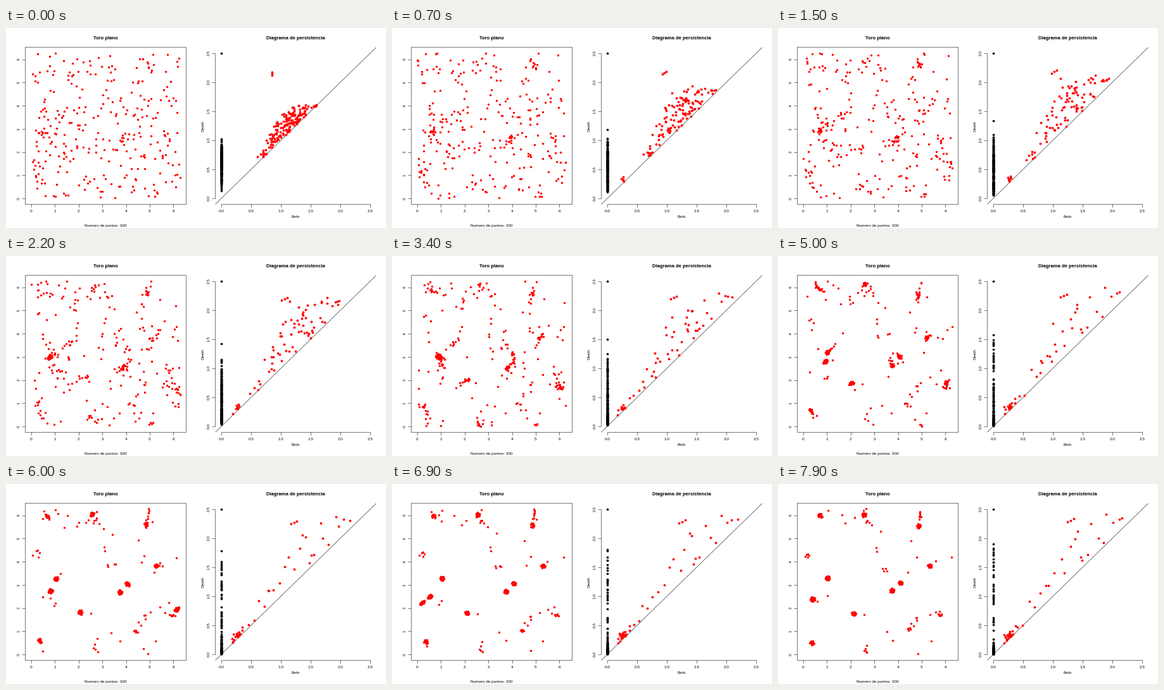
Recreate the animation shown at these times as a matplotlib script. Size 600 by 317 pixels, loop 8000 ms.

```python
import numpy as np
import matplotlib.pyplot as plt
from matplotlib.animation import FuncAnimation

W, H = 600, 317
FRAMES, STEP = 80, 100
DT = STEP / 1000
END = (FRAMES - 1) * DT
PX = 0.72  # points per pixel at 100 dpi
TAU = 2 * np.pi
N = 300
rng = np.random.default_rng(11)

# Columns of the torus where the particles slowly gather
HUBS = np.array([(0.4, 3.9), (2.2, 1.0), (3.4, 3.5), (5.0, 4.9), (5.8, 1.5), (4.6, 1.2),
                 (0.6, 6.2), (1.8, 4.6), (2.6, 6.0), (2.9, 1.6), (5.7, 4.0), (4.7, 3.1)])


def wrap(d):
    return (d + np.pi) % TAU - np.pi


def drift(p, t):
    """Velocity: long-range attraction, short-range repulsion, pull to the hubs."""
    d = wrap(p[None] - p[:, None])
    d2 = (d ** 2).sum(2)
    force = np.exp(-d2 / (2 * 0.55 ** 2)) - 4 * np.exp(-d2 / (2 * 0.08 ** 2))
    v = (0.1 + 0.3 * np.exp(-t / 0.6)) * (d * force[:, :, None]).sum(1)
    h = wrap(HUBS[None] - p[:, None, :2])
    near = np.exp(-(h ** 2).sum(2) / (2 * 0.5 ** 2))
    v[:, :2] += 0.12 * (h * near[:, :, None]).sum(1)
    return v


def tree_edges(p):
    """Edge lengths of the minimum spanning tree: deaths of the components."""
    dist = np.sqrt((wrap(p[None] - p[:, None]) ** 2).sum(2))
    best = dist[0].copy()
    best[0] = np.inf
    free = np.ones(N, bool)
    free[0] = False
    edges = []
    while free.any():
        k = np.argmin(np.where(free, best, np.inf))
        edges.append(best[k])
        free[k] = False
        best = np.minimum(best, dist[k])
    return np.array(edges)


# The torus is three-dimensional; the plot shows its first two angles
paths = [rng.uniform(0, TAU, (N, 3))]
for i in range(FRAMES - 1):
    paths.append((paths[-1] + DT * drift(paths[-1], i * DT)) % TAU)
deaths = [tree_edges(p) for p in paths]

# Loops: a few last, the others die out
LONG, SHORT, TINY = 22, 143, 22
M = LONG + SHORT
birth0 = np.r_[np.linspace(0.61, 1.6, LONG), np.clip(rng.normal(1.12, 0.2, SHORT), 0.7, 1.58)]
height = rng.beta(1.2, 1.6, M)
life = np.r_[np.full(LONG, np.inf), rng.exponential(1.9, SHORT)]
phase = rng.uniform(0, TAU, (M, 2))

# Tiny loops appear inside the clumps
tiny_birth = rng.normal(0.25, 0.035, TINY)
tiny_death = tiny_birth + 0.01 + rng.exponential(0.04, TINY)
tiny_start = np.maximum(np.linspace(-1, 7.5, TINY), 0.1)
tiny_phase = rng.uniform(0, TAU, TINY)


def components(i):
    v = np.append(deaths[i], 2.5)
    return np.column_stack([0 * v, v])


def loops(t):
    r = 1 - np.exp(-t / 0.7)
    wob = 0.025 * r * np.sin(2.1 * t + phase)
    birth = 1.1 + 0.15 * r + (birth0 - 1.1) * (1.9 - 0.9 * np.exp(-t / 2.5)) + wob[:, 0]
    room = 1.62 + 0.88 * (1 - np.exp(-t / 1.5)) - birth
    rise = height * room * np.minimum(birth / 1.1, 1) ** 3
    death = np.minimum(birth + np.maximum(rise + wob[:, 1], 0.012), 2.5)
    main = np.column_stack([birth, death])[life > t]

    k = np.arange(3)
    circles = np.column_stack([0.85 + 0.08 * r + 0.04 * t + 0.05 * k * r,
                               2.15 + 0.02 * t + 0.025 * (k - 1)])

    sway = 0.012 * np.sin(1.7 * t + tiny_phase)
    tiny = np.column_stack([tiny_birth + sway, tiny_death + sway])[tiny_start <= t]
    return np.vstack([main, circles, tiny])


def left_px(p):
    return np.column_stack([40 + 37.4 * p[:, 0], 270 - 36.75 * p[:, 1]])


def right_px(p):
    return np.column_stack([340 + 94 * p[:, 0], 270 - 92 * p[:, 1]])


plt.rcParams["font.family"] = "Liberation Sans"
fig = plt.figure(figsize=(W / 100, H / 100), dpi=100, facecolor="white")
ax = fig.add_axes([0, 0, 1, 1])
ax.set_xlim(0, W)
ax.set_ylim(H, 0)
ax.axis("off")


def line(xs, ys):
    ax.plot(xs, ys, color="black", lw=0.38, solid_capstyle="butt", zorder=1)


def text(x, y, s, size=6.4, **kw):
    ax.text(x, y, s, fontsize=size * PX, ha="center", va="center", **kw)


def ticks(xs, ys, labels, x0):
    for x, y, s in zip(xs, ys, labels):
        line([x, x], [279, 284])
        line([x0 - 5, x0], [y, y])
        text(x, 290.7, s)
        text(x0 - 10, y, s, rotation=90)


def dots(color, size, z):
    return ax.scatter([], [], s=(size * PX) ** 2, c=color, linewidths=0, zorder=z)


line([30, 284, 284, 30, 30], [30, 30, 279, 279, 30])
n = np.arange(7)
ticks(40 + 37.4 * n, 270 - 36.75 * n, [str(k) for k in n], 30)

v = np.arange(6) / 2
line([340, 575], [279, 279])
line([330, 330], [40, 270])
line([330.6, 584.4], [279.2, 30.8])
ticks(340 + 94 * v, 270 - 92 * v, [f"{k:.1f}" for k in v], 330)

text(157.3, 16.5, "Toro plano", 7.68, weight="bold")
text(457.5, 16.5, "Diagrama de persistencia", 7.68, weight="bold")
text(157.5, 313, f"Numero de puntos: {N}")
text(457.5, 299.5, "Birth")
text(311, 155, "Death", rotation=90)

points = dots("red", 3.4, 3)
column = dots("black", 3.6, 3)
cloud = dots("red", 3.8, 4)


def update(i):
    points.set_offsets(left_px(paths[i]))
    column.set_offsets(right_px(components(i)))
    cloud.set_offsets(right_px(loops(i * DT)))
    return points, column, cloud


anim = FuncAnimation(fig, update, frames=FRAMES, interval=STEP, repeat=True, repeat_delay=0)
plt.show()
```
